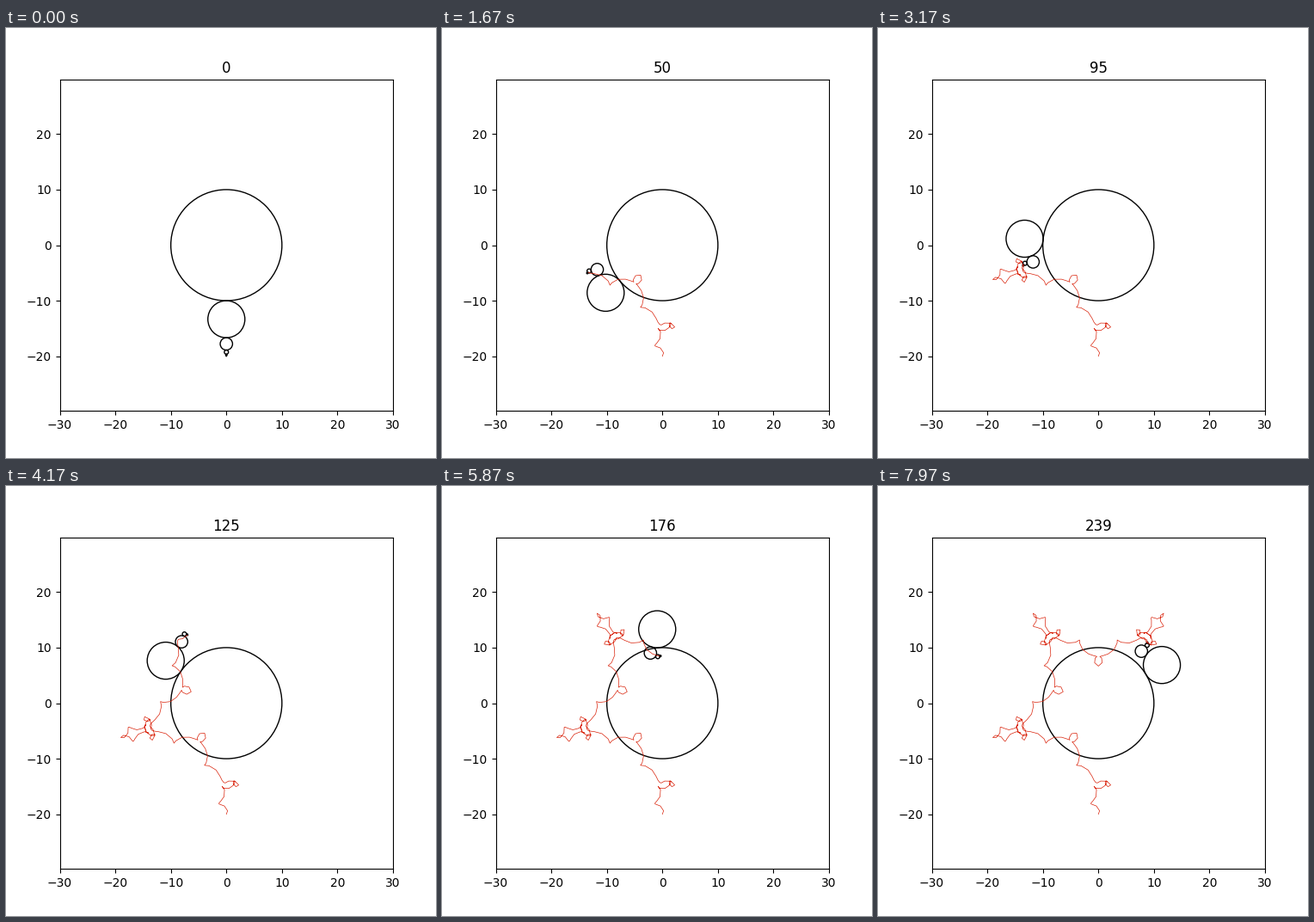
Write a matplotlib script that moves like this. It is 500 by 500 pixels and loops after 8 s.

```python
import numpy as np
import matplotlib.pyplot as plt
from matplotlib.animation import FuncAnimation
from matplotlib.patches import Circle

FRAMES = 240
LOOP_MS = 8000
LEVELS = 10
RATIO = 3
K = -4
TRAIL_COLOR = "#d92008"

radii = 10 / RATIO ** np.arange(LEVELS, dtype=float)


def orbit_centers(n):
    """Centres of the chained circles after n one-degree steps."""
    speed = -np.array([K ** i for i in range(LEVELS - 1)])
    angle = np.radians((-90 + speed * n) % 360)
    reach = radii[:-1] + radii[1:]
    steps = np.column_stack([reach * np.cos(angle), reach * np.sin(angle)])
    return np.vstack([[0, 0], np.cumsum(steps, axis=0)])


centers = np.array([orbit_centers(n) for n in range(FRAMES)])
trail = centers[:, -1]

fig, ax = plt.subplots(figsize=(5, 5), dpi=100)
ax.set_xlim(-30, 30)
half = 30 * 385 / 387.5  # equal scale on both axes
ax.set_ylim(-half, half)

circles = [ax.add_patch(Circle((0, 0), r, fill=False, ec="black", lw=1))
           for r in radii]
line, = ax.plot([], [], color=TRAIL_COLOR, lw=0.5)
title = ax.set_title("0")


def update(n):
    for circle, center in zip(circles, centers[n]):
        circle.center = center
    line.set_data(trail[:n + 1, 0], trail[:n + 1, 1])
    title.set_text(str(n))
    return [*circles, line, title]


anim = FuncAnimation(fig, update, frames=FRAMES, interval=LOOP_MS / FRAMES,
                     init_func=lambda: update(0), repeat=True,
                     repeat_delay=0, blit=False)
plt.show()
```
